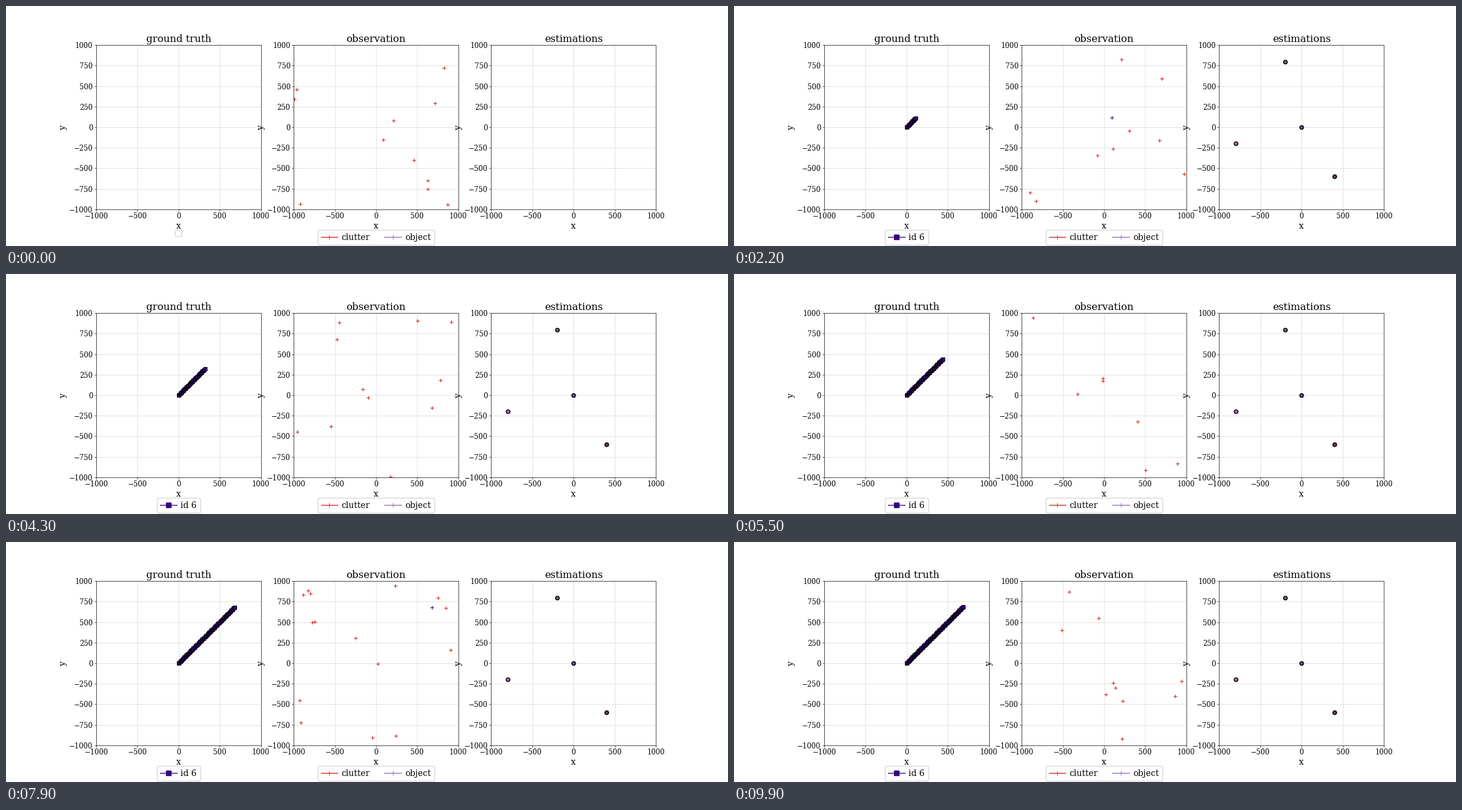
A matplotlib script that plays this animation: 1200x400 px, repeating every 10 s.

```python
import matplotlib.pyplot as plt
import numpy as np
from matplotlib.animation import FuncAnimation
from matplotlib.lines import Line2D

STEPS = 100
BIRTH, DEATH = 11, 80      # steps between which the object moves
SPEED = 10                 # units per step along both axes
NOISE = 10                 # spread of a reading around the object
DETECTION_RATE = 0.95
CLUTTER_MEAN = 10
LIMIT = 1000
INDIGO = "#36027e"
MARK = 4.47

ESTIMATES = [(-200, 800, "#5f7070"), (0, 0, "#5c5aa0"),
             (-800, -200, "#c468c0"), (400, -600, "#6e4044")]

plt.rcParams.update({
    "font.family": "DejaVu Serif",
    "font.size": 10,
    "axes.titlesize": 12,
    "axes.titlepad": 3.5,
    "axes.labelpad": 2,
    "axes.linewidth": 0.5,
    "xtick.labelsize": 8.33,
    "ytick.labelsize": 8.33,
    "xtick.major.size": 2,
    "ytick.major.size": 2,
    "xtick.major.width": 0.5,
    "ytick.major.width": 0.5,
    "xtick.major.pad": 2,
    "ytick.major.pad": 2,
    "grid.color": "#b0b0b0",
    "grid.linewidth": 0.5,
    "grid.alpha": 0.5,
    "legend.fontsize": 10,
    "legend.handletextpad": 0.45,
    "legend.columnspacing": 1.75,
})


def scan(step):
    """Clutter points and the object's noisy reading (empty if unseen)."""
    rng = np.random.default_rng(step)
    clutter = rng.uniform(-LIMIT, LIMIT, (2, rng.poisson(CLUTTER_MEAN)))
    alive = BIRTH <= step <= DEATH
    seen = alive and rng.random() < DETECTION_RATE
    centre = SPEED * (step - BIRTH)
    return clutter, rng.normal(centre, NOISE, (2, int(seen)))


def style_axes(ax, title):
    ax.set_title(title)
    ax.set_xlabel("x")
    ax.set_ylabel("y")
    ax.set(xlim=(-LIMIT, LIMIT), ylim=(-LIMIT, LIMIT))
    ax.set_xticks(range(-LIMIT, LIMIT + 1, 500))
    ax.set_yticks(range(-LIMIT, LIMIT + 1, 250))
    ax.set_aspect("equal")
    ax.set_axisbelow(True)
    ax.grid(True)


def add_legend(ax, handles, columns=1):
    return ax.legend(handles=handles, loc="upper center",
                     bbox_to_anchor=(0.5, -0.1), ncol=columns)


def key(label, color, marker, **style):
    return Line2D([], [], color=color, marker=marker, lw=1, label=label,
                  **style)


def points(ax, marker, color, xs=(), ys=(), **style):
    return ax.plot(xs, ys, ls="", marker=marker, ms=MARK, color=color,
                   **style)[0]


fig, (truth_ax, obs_ax, est_ax) = plt.subplots(1, 3, figsize=(12, 4), dpi=100)
style_axes(truth_ax, "ground truth")
style_axes(obs_ax, "observation")
style_axes(est_ax, "estimations")

empty_legend = add_legend(truth_ax, [])
track_legend = add_legend(truth_ax, [key("id 6", INDIGO, "s")])
truth_ax.add_artist(empty_legend)
add_legend(obs_ax, [key("clutter", "tab:red", "+", mew=0.6),
                    key("object", "tab:purple", "+", mew=0.6)], columns=2)

track = points(truth_ax, "s", INDIGO, mec="black", mew=0.6, zorder=3)
clutter = points(obs_ax, "+", "tab:red", mew=0.8)
reading = points(obs_ax, "+", INDIGO, mew=0.8)
dots = [points(est_ax, "o", color, [x], [y], mec="black", mew=1.1, zorder=3)
        for x, y, color in ESTIMATES]


def update(step):
    path = SPEED * np.arange(max(0, min(step, DEATH) - BIRTH + 1))
    track.set_data(path, path)
    track_legend.set_visible(step >= BIRTH)
    empty_legend.set_visible(step < BIRTH)

    false_alarms, detection = scan(step)
    clutter.set_data(*false_alarms)
    reading.set_data(*detection)

    for dot in dots:
        dot.set_visible(step > 0)
    return [track, clutter, reading, *dots]


anim = FuncAnimation(fig, update, frames=STEPS, interval=100, repeat=True,
                     repeat_delay=0, blit=False)
plt.show()
```
